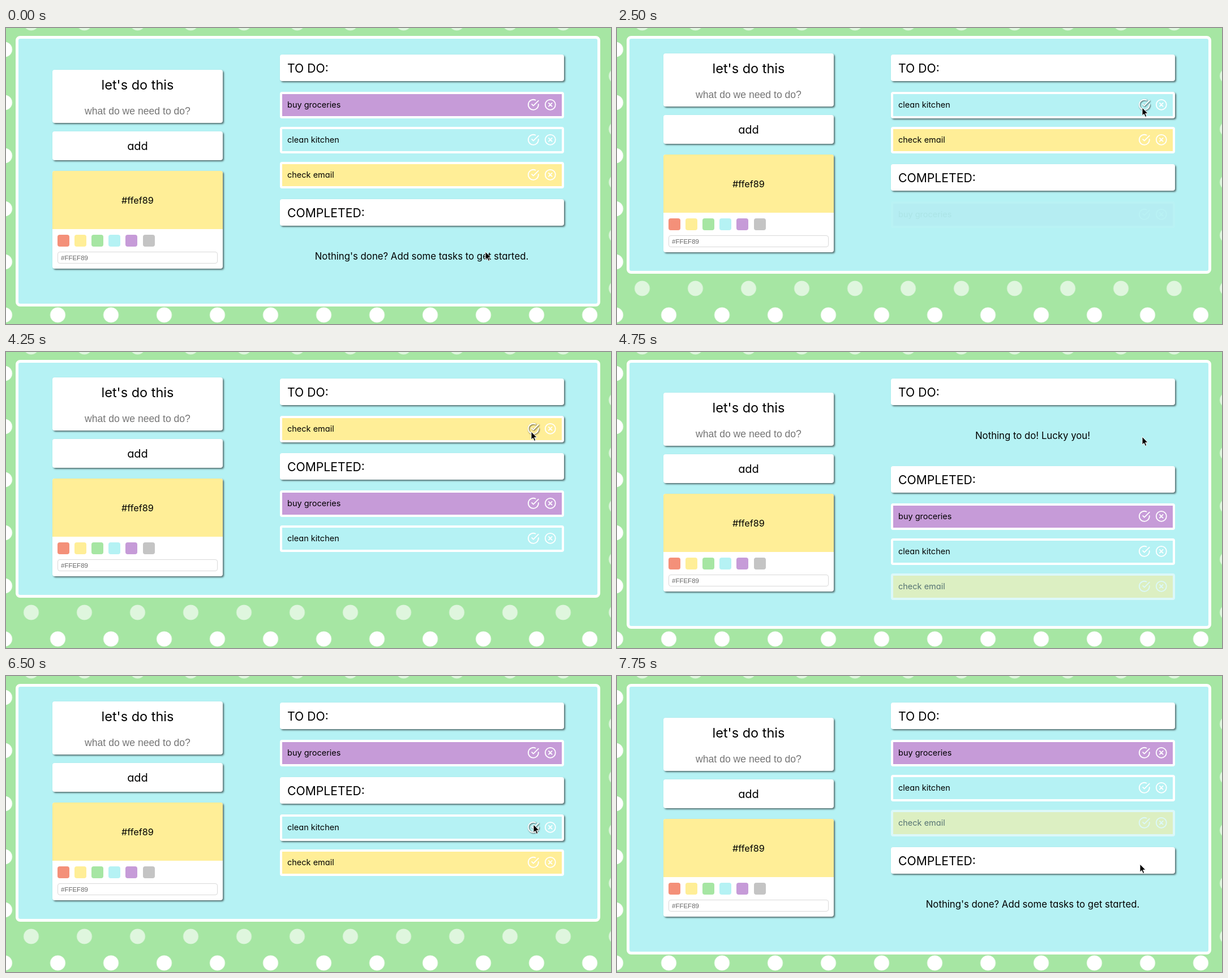
Animation, 1069 px wide and 524 px high, one loop 8000 ms. Source, as an HTML page:

```html
<!DOCTYPE html>
<html lang="en">
<head>
<meta charset="utf-8">
<title>To-do list</title>
<style>
  :root {
    --red: #f49079; --yellow: #ffee97; --green: #a6e6a3;
    --cyan: #b5f2f4; --purple: #c69bd8; --grey: #c4c4c4;
    --shadow: 2px 2px 3px rgba(0, 0, 0, .55);
  }
  html, body { margin: 0; width: 100%; height: 100%; overflow: hidden; }
  body {
    position: relative;
    font-family: Inter, Lato, sans-serif;
    font-feature-settings: "cv11";
    font-optical-sizing: none;
    color: #000;
    background-color: var(--green);
    background-image:
      radial-gradient(circle, #fff 13px, transparent 13.8px),
      radial-gradient(circle, rgba(255, 255, 255, .64) 13px, transparent 13.8px);
    background-size: 94px 94px;
    background-position: -49.5px -9px, -2.5px 38px;
  }
  body div, body svg { position: absolute; box-sizing: border-box; white-space: nowrap; }
  #panel {
    left: 17px; top: 14px; width: 1033px;
    background: var(--cyan); border: 5px solid #fff; border-radius: 8px;
  }
  #side { left: 82px; width: 301px; }
  .card { left: 0; width: 301px; background: #fff; border-radius: 4px; box-shadow: var(--shadow); }
  .mid { left: 0; width: 100%; text-align: center; line-height: 30px; }
  #add.ring { box-shadow: var(--shadow), 0 0 2px 3px #c273a4; }
  #tone {
    left: 0; top: 0; width: 301px; height: 103px;
    background: var(--yellow); border-radius: 4px 4px 0 0;
  }
  .swatch { top: 113px; width: 21px; height: 21px; border-radius: 4px; }
  #hex {
    left: 9px; top: 143px; width: 283px; height: 21px; padding-left: 5px;
    border: 1px solid #d9d9d9; border-radius: 4px;
    font: 11.5px/20px "Liberation Sans", Arial, sans-serif; color: #666;
  }
  .head {
    left: 484px; width: 502px; height: 47px; padding-left: 13px;
    background: #fff; border-radius: 4px; box-shadow: var(--shadow);
    font-size: 21.2px; line-height: 48px;
  }
  .row {
    left: 484px; width: 502px; height: 47px; padding-left: 9px;
    border: 4.5px solid #fff; border-radius: 4px;
    font-size: 14.5px; line-height: 37px;
  }
  .row.hover { box-shadow: var(--shadow); }
  .row svg {
    top: 8px; width: 21.6px; height: 21.6px; overflow: visible;
    fill: none; stroke: #fff; stroke-width: 2; stroke-linecap: round; stroke-linejoin: round;
  }
  .row .lit { filter: drop-shadow(1.5px 1.5px 1px rgba(0, 0, 0, .7)); }
  .note { left: 484px; width: 501px; text-align: center; font-size: 16.75px; line-height: 30px; }
  #cursor { left: 0; top: 0; width: 14px; height: 20px; overflow: visible; }
</style>
</head>
<body>
<div id="panel"></div>
<div id="side">
  <div class="card" style="top:0;height:94px">
    <div class="mid" style="top:12px;font-size:23.5px">let's do this</div>
    <div class="mid" style="top:58px;font-size:17.6px;font-family:'Liberation Sans',Arial,sans-serif;color:#757575">what do we need to do?</div>
  </div>
  <div class="card" id="add" style="top:109px;height:51px">
    <div class="mid" style="top:11px;font-size:20px">add</div>
  </div>
  <div class="card" id="picker" style="top:179px;height:173px">
    <div id="tone"><div class="mid" style="top:37px;font-size:16.3px">#ffef89</div></div>
    <div id="hex">#FFEF89</div>
  </div>
</div>
<div class="head" style="top:47px">TO DO:</div>
<div class="head" id="doneHead">COMPLETED:</div>
<div class="note" id="noTodo" style="top:133px">Nothing to do! Lucky you!</div>
<div class="note" id="noDone">Nothing's done? Add some tasks to get started.</div>
<svg id="cursor" viewBox="0 0 14 20">
  <path d="M0 0V14.2L3.2 11.3L5.4 16.4L7.8 15.4L5.6 10.3H10Z" fill="#000" stroke="#fff" stroke-width="1" stroke-linejoin="round"/>
</svg>
<script>
const LOOP = 8000, STEP = 250, FADE = 500, PITCH = 62;
const $ = id => document.getElementById(id);

const tasks = [
  { text: 'buy groceries', tone: 'purple' },
  { text: 'clean kitchen', tone: 'cyan' },
  { text: 'check email', tone: 'yellow' }
];
// [time, index of the task that changes list]
const clicks = [[2500, 0], [3500, 1], [4500, 2], [5750, 0], [6750, 1], [7500, 2]];
// [time, x, y] of the pointer tip
const path = [
  [0, 847, 396], [250, 847, 396], [500, 860, 352], [750, 888, 250], [1000, 915, 160],
  [1250, 925, 124], [1500, 928, 142], [1750, 928, 141], [4500, 928, 141],
  [4750, 928, 150], [5000, 928, 215], [5250, 925, 285], [5500, 924, 297],
  [5750, 924, 297], [6000, 926, 288], [6250, 932, 266], [6500, 932, 263],
  [6750, 932, 263], [7000, 929, 290], [7250, 924, 333], [8000, 924, 333]
];

const CHECK = '<path d="M22 11.08V12a10 10 0 1 1-5.93-9.14M22 4L12 14.01l-3-3"/>';
const CROSS = '<circle cx="12" cy="12" r="10"/><path d="M15.2 8.8l-6.4 6.4M8.8 8.8l6.4 6.4"/>';
const icon = (shape, left) => `<svg viewBox="0 0 24 24" style="left:${left}px">${shape}</svg>`;

for (const task of tasks) {
  const row = document.createElement('div');
  row.className = 'row';
  row.style.background = `var(--${task.tone})`;
  row.innerHTML = task.text + icon(CHECK, 433) + icon(CROSS, 462.5);
  document.body.insertBefore(row, $('cursor'));
  task.row = row;
  task.check = row.querySelector('svg');
}

['red', 'yellow', 'green', 'cyan', 'purple', 'grey'].forEach((tone, i) => {
  const box = document.createElement('div');
  box.className = 'swatch';
  box.style.cssText = `left:${9 + 30.1 * i}px;background:var(--${tone})`;
  $('picker').append(box);
});

function pointer(t) {
  const i = path.findIndex(p => p[0] > t);
  const [t0, x0, y0] = path[i - 1], [t1, x1, y1] = path[i];
  const k = (t - t0) / (t1 - t0);
  return [x0 + (x1 - x0) * k, y0 + (y1 - y0) * k];
}

function draw(t) {
  const [x, y] = pointer(t);
  const done = [false, false, false], since = [-LOOP, -LOOP, -LOOP];
  for (const [at, i] of clicks) {
    if (t >= at) { done[i] = !done[i]; since[i] = at; }
  }
  const left = done.filter(d => !d).length;
  const headTop = left ? 117 + PITCH * left : 202;
  const next = [113, headTop + 66];

  tasks.forEach(({ row, check }, i) => {
    const list = +done[i], top = next[list];
    next[list] += PITCH;
    const mid = top + 23.5;
    const near = t >= clicks[0][0];
    row.style.top = top + 'px';
    row.style.opacity = Math.min(1, .05 + .95 * (t - since[i]) / FADE);
    row.classList.toggle('hover', near && Math.abs(y - mid) < 23);
    check.classList.toggle('lit', near && Math.hypot(x - 932, y - mid) < 11);
  });

  const bottom = left === 3 ? 493 : left ? 434.5 : 490;
  $('panel').style.height = bottom - 14 + 'px';
  $('side').style.top = (left === 3 ? 74 : left ? 45 : 72) + 'px';
  $('doneHead').style.top = headTop + 'px';
  $('noDone').style.top = headTop + 86 + 'px';
  $('noDone').style.visibility = left === 3 ? 'visible' : 'hidden';
  $('noTodo').style.visibility = left ? 'hidden' : 'visible';
  $('add').classList.toggle('ring', t >= 1750 && t < 2500);
  $('cursor').style.transform = `translate(${x}px, ${y}px)`;
}

const start = performance.now();
function tick() {
  const t = Math.max(0, performance.now() - start) % LOOP;
  draw(Math.floor(t / STEP) * STEP);
  requestAnimationFrame(tick);
}
tick();
</script>
</body>
</html>
```
